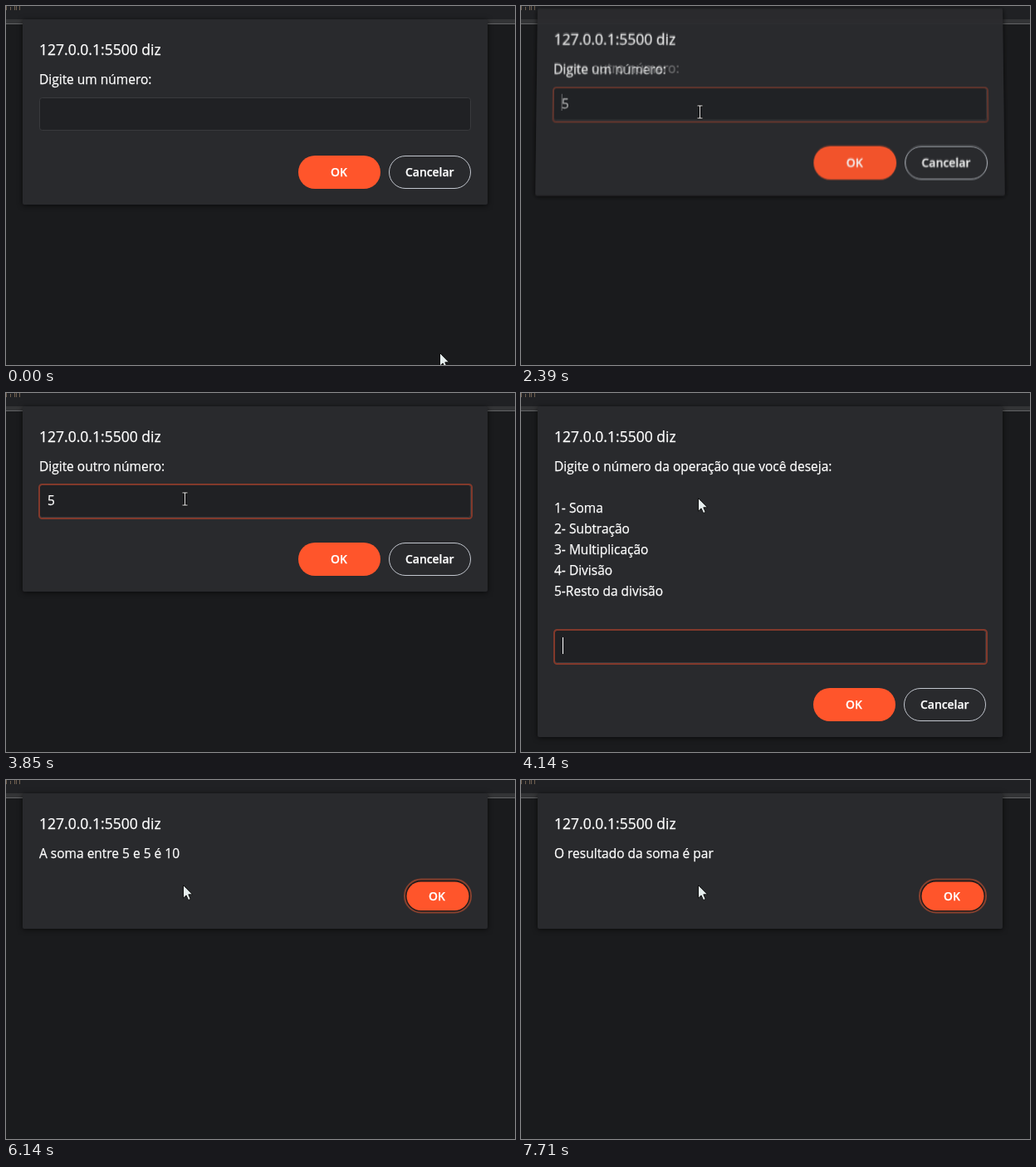
An HTML page for the animation above (8 s loop, 613x432 px).

```html
<!DOCTYPE html>
<html lang="pt">
<head>
<meta charset="utf-8">
<title>Calculadora</title>
<style>
  html, body { margin: 0; width: 100%; height: 100%; overflow: hidden; background: #1a1b1d; }
  svg, #dialogs { position: absolute; left: 0; top: 0; width: 613px; height: 432px; overflow: hidden; }
  text { font: 15.5px "Open Sans", "Noto Sans", sans-serif; fill: #fff; stroke: #fff; stroke-width: .25px; white-space: pre; }
  .title { font-size: 17.5px; }
  .label { font-size: 13.9px; font-weight: 600; text-anchor: middle; }
  .dialog { transform-origin: 300px 16px; }
  .panel { filter: drop-shadow(0 1px 3px rgba(0, 0, 0, .65)); }
</style>
</head>
<body>
<svg id="page" viewBox="0 0 613 432">
  <rect width="613" height="432" fill="#1a1b1d"/>
  <rect width="613" height="16" fill="#202124"/>
  <path d="M.5 0V5M5.5 1V5M10.5 0V5M12.5 0V5M16.5 0V5" stroke="#85705c" opacity=".8"/>
  <rect id="flash" x="364" width="249" height="16" fill="#343434"/>
  <rect y="16" width="613" height="5" fill="#333436"/>
  <rect y="21" width="613" height="1" fill="#626365"/>
</svg>
<div id="dialogs"></div>
<svg viewBox="0 0 613 432">
  <path id="arrow" d="M.5 -.5V15.2L4.1 11.9L6.6 17.6L9.3 16.4L6.8 10.8H11.6Z" fill="#e6eeee" stroke="#111"/>
  <g id="beam" fill="none">
    <path d="M-3 -7.5H3M0 -7.5V7.5M-3 7.5H3" stroke="#0c0c0d" stroke-width="3"/>
    <path d="M-3 -7.5H3M0 -7.5V7.5M-3 7.5H3" stroke="#e6e6e6"/>
  </g>
</svg>
<script>
const LOOP = 8000;
const $ = id => document.getElementById(id);
const show = (node, on) => { node.style.display = on ? "" : "none"; };
const within = (t, [a, b]) => t >= a && t < b;

const text = (x, y, s, cls = "") => `<text x="${x}" y="${y}" class="${cls}">${s}</text>`;

const frame = (height, lines) =>
  `<rect class="panel" x="20" y="16" width="560" height="${height}" rx="2" fill="#292a2d"/>` +
  text(40, 59, "127.0.0.1:5500 diz", "title") +
  lines.map((s, i) => text(40, 94 + i * 25, s)).join("");

// dy moves the field and the buttons below a longer message
const prompt = (lines, value, dy = 0) => frame(223 + dy, lines) + `
  <g transform="translate(0 ${dy})">
    <rect x="40.5" y="110.5" width="519" height="39" rx="3" fill="#202124" stroke="#393a3d"/>
    <rect class="ring" x="40" y="110" width="521" height="41" rx="3.5" fill="none" stroke="#82392b" stroke-width="2"/>
    <g class="value">${text(50, 135, value)}</g>
    <rect class="caret" y="119" width="1" height="20" fill="#fff"/>
    <rect x="352" y="180" width="99" height="40" rx="20" fill="#ff552b"/>
    <rect x="461.5" y="180.5" width="98" height="39" rx="19.5" fill="none" stroke="#c2c6ce"/>
    ${text(401, 205, "OK", "label")}
    ${text(510.3, 205, "Cancelar", "label")}
  </g>`;

const notice = line => frame(163, [line]) + `
  <rect class="plain" x="480" y="120" width="80" height="40" rx="20" fill="#ff552b"/>
  <g class="ring">
    <rect x="480" y="119.5" width="80" height="40" rx="20" fill="#1f1c1d" stroke="#86412f" stroke-width="2"/>
    <rect x="482.5" y="122.5" width="75" height="34.5" rx="17.2" fill="#ff552b"/>
  </g>
  ${text(519, 145, "OK", "label")}`;

const menu = ["Digite o número da operação que você deseja:", "", "1- Soma", "2- Subtração",
  "3- Multiplicação", "4- Divisão", "5-Resto da divisão"];

// open/close: start of each change; typed: key press; blinks: when the caret is lit
const dialogs = [
  { html: prompt(["Digite um número:"], "5"), open: -LOOP, close: 2390, focus: 590,
    typed: 1660, blinks: [[590, 1080], [1600, 2190]] },
  { html: prompt(["Digite outro número:"], "5"), open: 2390, close: 4000, focus: 2470,
    typed: 3350, blinks: [[2390, 2850], [3350, 3850]] },
  { html: prompt(menu, "1", 175), open: 4000, close: 6000, focus: 4080,
    typed: 5020, blinks: [[4000, 4550], [5020, 5520]] },
  { html: notice("A soma entre 5 e 5 é 10"), open: 6000, close: 7530, focus: 6140 },
  { html: notice("O resultado da soma é par"), open: 7610, close: 2 * LOOP, focus: 7710 }
];

const SVG = "http://www.w3.org/2000/svg";
for (const d of dialogs) {
  d.node = document.createElementNS(SVG, "svg");
  d.node.setAttribute("viewBox", "0 0 613 432");
  d.node.setAttribute("class", "dialog");
  d.node.innerHTML = d.html;
  for (const part of ["ring", "value", "caret", "plain"]) d[part] = d.node.querySelector("." + part);
  $("dialogs").prepend(d.node);
}

// Right part whole, left part as a 16 px checkerboard whose phase flips in a diagonal band
function checkerPath() {
  let path = "M364 22H613V432H364Z";
  for (let row = 0; row < 9; row++)
    for (let col = 0; col < 16; col++) {
      const diagonal = row + col;
      const flipped = diagonal >= 7 && diagonal < 14;
      if ((diagonal % 2 === 1) === flipped)
        path += `M${108 + col * 16} ${34 + row * 16}h16v16h-16Z`;
    }
  return `path("${path}")`;
}
const CHECKER = checkerPath();
const DISSOLVE = [7530, 7610];

// [lift, tilt in degrees, opacity], or null when hidden
function pose(d, t) {
  const age = t - d.open, gone = t - d.close;
  if (age < 0 || gone >= 80) return null;
  if (gone >= 0) return d.close === DISSOLVE[0] ? [-5, 1.2, .97] : [-12, 2.3, .62];
  if (d.open === DISSOLVE[1]) return age < 50 ? [-10, 2, .65] : age < 100 ? [-3, .8, .95] : [0, 0, 1];
  return age < 80 ? [-13.5, 2.6, .85] : age < 140 ? [-4, .8, .97] : [0, 0, 1];
}

function drawDialog(d, t) {
  const p = pose(d, t);
  show(d.node, p);
  if (!p) return;
  const [lift, tilt, opacity] = p;
  d.node.style.opacity = opacity;
  d.node.style.transform = tilt ? `perspective(1000px) translateY(${lift}px) rotateX(${tilt}deg)` : "none";
  const focused = t >= d.focus && (d.caret || t < d.close);
  show(d.ring, focused);
  if (d.plain) show(d.plain, !focused);
  if (!d.caret) return;
  const typed = t >= d.typed;
  show(d.value, typed);
  show(d.caret, d.blinks.some(b => within(t, b)));
  d.caret.setAttribute("x", typed ? 59 : 50);
}

function drawPointer(t) {
  const step = t < 70 ? 0 : Math.min(7, 1 + Math.floor((t - 70) / 74.2));
  const u = step / 7, e = u * u * (3 - 2 * u);
  const x = Math.round(522 + (213 - 522) * e), y = Math.round(418 + (127 - 418) * e);
  const beam = t < 4000 && y < 150;
  show($("beam"), beam);
  show($("arrow"), !beam);
  $("beam").setAttribute("transform", `translate(${x + 2.5} ${y + .5})`);
  $("arrow").setAttribute("transform", `translate(${x} ${y})`);
}

function draw(t) {
  const dissolving = within(t, DISSOLVE);
  show($("flash"), dissolving);
  $("dialogs").style.clipPath = dissolving ? CHECKER : "none";
  for (const d of dialogs) drawDialog(d, t);
  drawPointer(t);
}

const start = performance.now();
function tick() {
  draw((performance.now() - start) % LOOP);
  requestAnimationFrame(tick);
}
tick();
</script>
</body>
</html>
```
